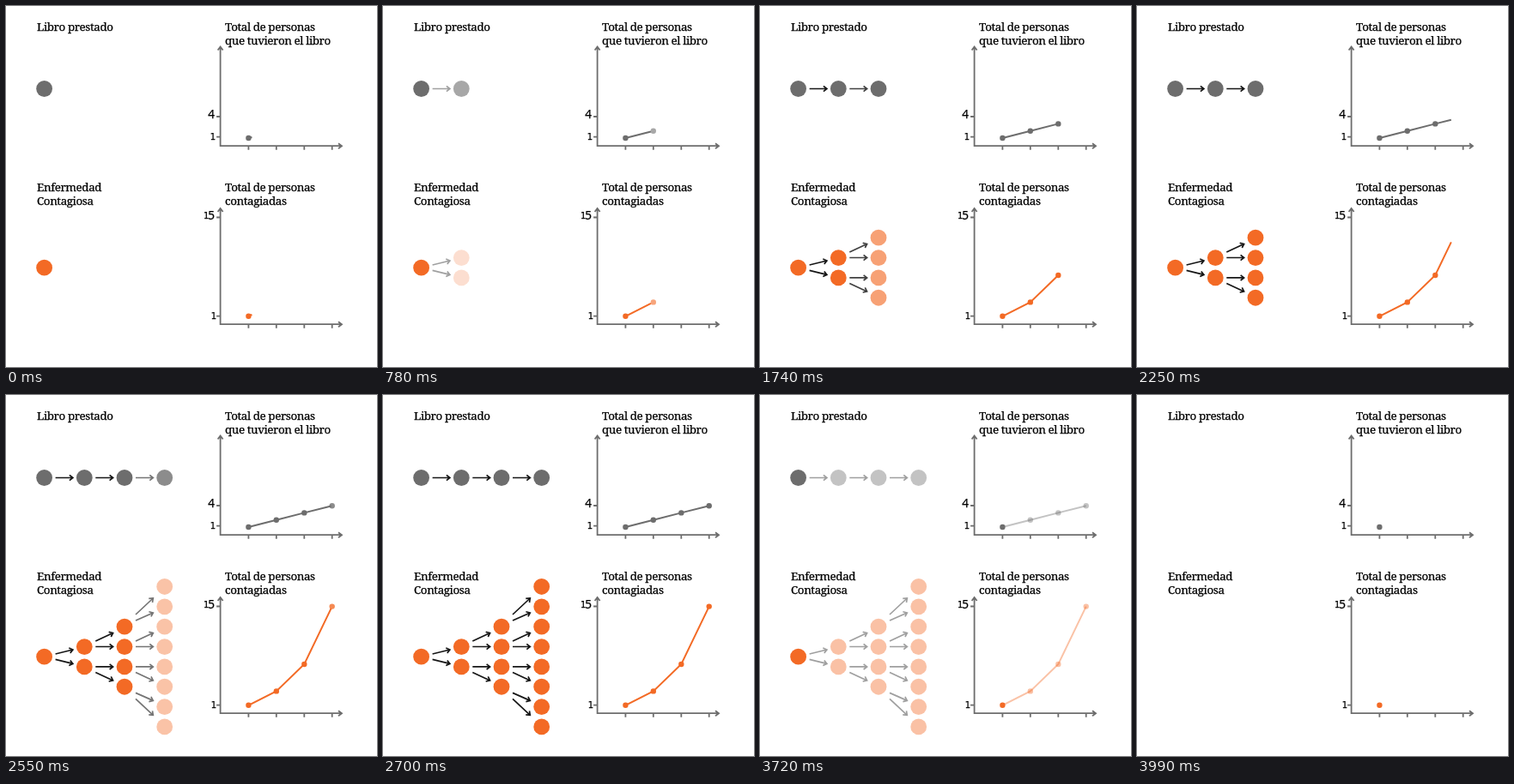
These frames come from a looping animation (432 px wide and 421 px high, 4050 ms). An HTML page:

```html
<!DOCTYPE html>
<html lang="es">
<head>
<meta charset="utf-8">
<title>Libro y contagio</title>
<style>
html, body { margin: 0; width: 100%; height: 100%; overflow: hidden; background: #fff; }
svg { display: block; width: 100vw; height: 100vh; }
text { fill: #000; stroke: #000; stroke-width: 0.25; }
.title { font: 13.4px "Noto Serif", serif; letter-spacing: -0.41px; }
.one { font: 10px "DejaVu Sans", sans-serif; text-anchor: end; }
.num { font: 13.5px "Noto Sans", sans-serif; text-anchor: end; }
.axis { fill: none; stroke: #6d6d6d; stroke-width: 1.8; }
.arrow { fill: none; stroke: #161616; stroke-width: 1.7; }
.line { fill: none; stroke-width: 2; }
</style>
</head>
<body>
<svg id="stage" viewBox="0 0 432 421"></svg>
<script>
const GREY = '#6d6d6d', ORANGE = '#f36a25';
const LOOP = 4050, STEP = 30, PERIOD = 863, FADE = 235;
const BALL = 9.4, DOT = 3.2;
const colX = [44.6, 91.3, 138, 184.7];
const tickX = [282.4, 314.8, 347.3, 379.7];
const greyY = 96.5, midY = 305.2, gap = 23.35;
// each line segment: start and duration
const segments = [[-30, 890], [951, 762], [1814, 762]];
// upper half of the tree's arrows, [from, to] heights per column
const branches = [
  [[302, 297]],
  [[287, 277.5], [293.5, 293.5]],
  [[256, 237], [263, 254], [287, 277.5], [293.5, 293.5]]
];

const stage = document.getElementById('stage');
const clamp = v => Math.max(0, Math.min(1, v));

function add(parent, tag, attrs, text) {
  const el = document.createElementNS('http://www.w3.org/2000/svg', tag);
  for (const key in attrs) el.setAttribute(key, attrs[key]);
  if (text) el.textContent = text;
  parent.appendChild(el);
  return el;
}

const label = (cls, x, y, text) => add(stage, 'text', { class: cls, x, y }, text);
const disc = (parent, cx, cy, r, fill) => add(parent, 'circle', { cx, cy, r, fill });

function arrow(parent, x, y1, y2) {
  const dx = 20.3, dy = y2 - y1, len = Math.hypot(dx, dy);
  const turn = Math.atan2(dy, dx) * 180 / Math.PI;
  add(parent, 'path', {
    class: 'arrow',
    transform: `translate(${x} ${y1}) rotate(${turn})`,
    d: `M0 0H${len}M${len - 4} -3.1L${len} 0L${len - 4} 3.1`
  });
}

function axes(top, base, marks) {
  const x = 249.6;
  let d = `M${x} ${top}V${base}H391M${x - 3} ${top + 4}L${x} ${top}L${x + 3} ${top + 4}`;
  d += `M387 ${base - 3}L391 ${base}L387 ${base + 3}`;
  for (const tx of tickX) d += `M${tx} ${base}v4.5`;
  for (const my of marks) d += `M${x} ${my}h-4.5`;
  add(stage, 'path', { class: 'axis', d });
}

label('title', 36, 29, 'Libro prestado');
label('title', 255, 29, 'Total de personas');
label('title', 255, 45, 'que tuvieron el libro');
label('title', 36, 216, 'Enfermedad');
label('title', 36, 232, 'Contagiosa');
label('title', 255, 216, 'Total de personas');
label('title', 255, 232, 'contagiadas');

axes(47.5, 163.2, [129, 152.6]);
axes(236, 371.2, [246.5, 361.6]);
label('num', 243, 131, '4');
label('one', 244, 156, '1');
label('one', 236.3, 248, '1');
label('num', 243, 249, '5');
label('one', 245, 364.5, '1');

const roots = add(stage, 'g', {});
disc(roots, colX[0], greyY, BALL, GREY);
disc(roots, colX[0], midY, BALL, ORANGE);

// fading groups of one generation, each with its own start
const fades = [];
function fadeGroup(start) {
  const el = add(stage, 'g', {});
  fades.push({ el, start });
  return el;
}

const plots = [
  { color: GREY, ys: [154, 145.8, 137.4, 129.2] },
  { color: ORANGE, ys: [361.8, 345.4, 314, 246.6] }
];
for (const plot of plots) {
  plot.line = add(stage, 'path', { class: 'line', stroke: plot.color });
  disc(stage, tickX[0], plot.ys[0], DOT, plot.color);
}

for (let i = 1; i < 4; i++) {
  const shift = (i - 1) * PERIOD;
  const first = fadeGroup(640 + shift);
  const links = fadeGroup(685 + shift);
  const tree = fadeGroup(730 + shift);

  disc(first, colX[i], greyY, BALL, GREY);
  for (const plot of plots) disc(first, tickX[i], plot.ys[i], DOT, plot.color);

  const x = colX[i - 1] + 13;
  arrow(links, x, greyY, greyY);
  for (const [a, b] of branches[i - 1]) {
    arrow(links, x, a, b);
    arrow(links, x, 2 * midY - a, 2 * midY - b);
  }

  const count = 2 ** i;
  for (let k = 0; k < count; k++) {
    disc(tree, colX[i], midY + (k - (count - 1) / 2) * gap, BALL, ORANGE);
  }
}

function linePath(ys, t) {
  let d = `M${tickX[0]} ${ys[0]}`;
  segments.forEach(([start, span], i) => {
    const p = clamp((t - start) / span);
    if (p > 0) {
      d += `L${tickX[i] + (tickX[i + 1] - tickX[i]) * p} ${ys[i] + (ys[i + 1] - ys[i]) * p}`;
    }
  });
  return d;
}

function draw(ms) {
  let t = Math.floor((ms % LOOP) / STEP + 1e-6) * STEP;
  if (t < 90) t = 80;
  const out = 1 - clamp((t - 3590) / 220);
  for (const { el, start } of fades) {
    el.setAttribute('opacity', clamp((t - start) / FADE) * out);
  }
  for (const { line, ys } of plots) {
    line.setAttribute('d', linePath(ys, t));
    line.setAttribute('opacity', out);
  }
  roots.setAttribute('opacity', t < 3990 ? 1 : 0);
}

let begin = null;
function tick(now) {
  if (begin === null) begin = now;
  draw(Math.max(0, now - begin));
  requestAnimationFrame(tick);
}
draw(0);
requestAnimationFrame(tick);
</script>
</body>
</html>
```
